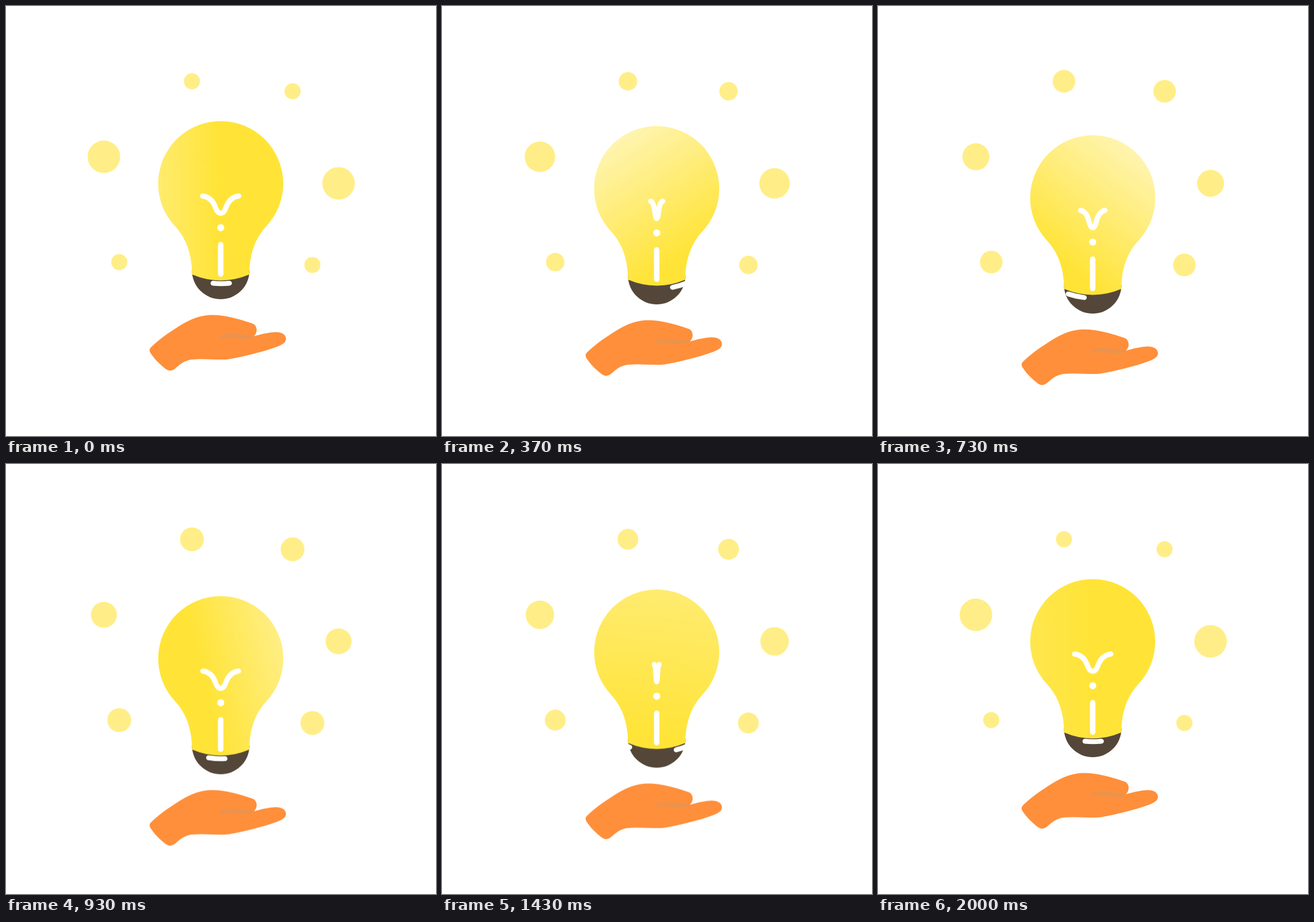
An HTML page for the animation above (2.03 s loop, 748x748 px).

```html
<!DOCTYPE html>
<html lang="en">
<head>
<meta charset="utf-8">
<title>Floating light bulb</title>
<style>
  html, body { margin: 0; width: 100%; height: 100%; overflow: hidden; background: #fff; }
  svg { display: block; width: 748px; height: 748px; }

  /* Two seconds of motion plus a short hold: 49.26% = 1 s, 98.52% = 2 s */
  .float, .small, .big, .glow, .wire, .band {
    animation-duration: 2030ms;
    animation-iteration-count: infinite;
    animation-timing-function: cubic-bezier(.37, 0, .63, 1);
  }

  .float { animation-name: float; }
  @keyframes float {
    0%, 98.52%, 100% { transform: translateY(0); }
    49.26% { transform: translateY(30px); }
  }

  .spark { fill: #ffee87; }
  .small { r: 14px; animation-name: grow; }
  @keyframes grow {
    0%, 98.52%, 100% { r: 14px; }
    49.26% { r: 20.8px; }
  }
  .big { r: 28.3px; animation-name: shrink; }
  @keyframes shrink {
    0%, 98.52%, 100% { r: 28.3px; }
    49.26% { r: 22.5px; }
  }

  /* Light swings over the bulb and back, weaker on the way back */
  .glow {
    transform-origin: 370px 460px;
    animation-name: swing, fade;
    animation-timing-function: linear;
  }
  @keyframes swing {
    0%, 98.52%, 100% { transform: rotate(-90deg); }
    18.23%, 80.3% { transform: rotate(-34deg); }
    28.08%, 70.44% { transform: rotate(6deg); }
    49.26% { transform: rotate(90deg); }
  }
  @keyframes fade {
    0%, 49.26% { opacity: 1; }
    59%, 100% { opacity: .42; }
  }

  .white { fill: none; stroke: #fff; stroke-linecap: round; stroke-linejoin: round; }

  /* Filament turning around the vertical axis */
  .wire { stroke-width: 9px; animation-name: turn; }
  @keyframes turn {
    0%, 49.26%, 98.52%, 100% {
      d: path("M342 330.5 C353 332 359 338 363 347 C366 355 368 360.5 373.5 360.5 C379 360.5 381 355 384 347 C388 338 394 332 405 330.5");
      animation-timing-function: cubic-bezier(.47, 0, .745, .715);
    }
    24.63%, 73.89% {
      d: path("M375.4 330.5 C374.7 332 374.4 338 374.1 347 C374 355 373.8 360.5 373.5 360.5 C373.2 360.5 373 355 372.9 347 C372.6 338 372.3 332 371.6 330.5");
      animation-timing-function: cubic-bezier(.39, .575, .565, 1);
    }
  }

  .band {
    stroke-width: 8.5px;
    stroke-dasharray: 28 80;
    animation-name: spin;
    animation-timing-function: linear;
  }
  @keyframes spin {
    0% { stroke-dashoffset: -40; }
    98.52%, 100% { stroke-dashoffset: -256; }
  }
</style>
</head>
<body>
<svg viewBox="0 0 748 748">
  <defs>
    <path id="glass" d="M294 383 A108.7 108.7 0 1 1 453 383 C435 402 423.3 430 423.3 467 Q373.5 488 323.7 467 C323.7 430 312 402 294 383 Z"/>
    <clipPath id="inside"><use href="#glass"/></clipPath>
    <linearGradient id="light" gradientUnits="userSpaceOnUse" x1="0" y1="460" x2="0" y2="213">
      <stop offset="0" stop-color="#fff5b8" stop-opacity="0"/>
      <stop offset="1" stop-color="#fff5b8"/>
    </linearGradient>
  </defs>

  <g class="spark">
    <circle class="small" cx="323.5" cy="131"/>
    <circle class="small" cx="498.5" cy="148.3"/>
    <circle class="small" cx="197" cy="445.5"/>
    <circle class="small" cx="533" cy="450.5"/>
    <circle class="big" cx="170.3" cy="262.3"/>
    <circle class="big" cx="578.5" cy="308.5"/>
  </g>

  <g class="float">
    <path fill="#544739" d="M323.5 460 A50 50 0 0 0 423.5 460 Z"/>
    <use href="#glass" fill="#ffe437"/>
    <g clip-path="url(#inside)">
      <rect class="glow" x="-130" y="-140" width="1000" height="600" fill="url(#light)"/>
    </g>

    <g class="white">
      <path class="wire" d="M342 330.5 C353 332 359 338 363 347 C366 355 368 360.5 373.5 360.5 C379 360.5 381 355 384 347 C388 338 394 332 405 330.5"/>
      <path stroke-width="9.5" d="M373.5 415.3 V466.3"/>
      <path class="band" pathLength="108" d="M320.3 472 Q374.3 494 428.3 472"/>
    </g>
    <circle cx="373.5" cy="385.7" r="6.2" fill="#fff"/>

    <path fill="#ff8f3a" d="M251 603 C248 597 251 595 256 590 C270 577 288 565 305 554.5 C321 544.5 339 537.5 359 537.5 C381 537.5 408 545 429 552.5 C438 556 438 569 431 574.5 C443 571.5 454 568 466 567.5 C478 566.5 487 571 487 579 C487 586 480 589 472 592.5 C446 602 411 610.5 387 614.5 C369 616.5 345 612.5 323 615 C310 616.5 302 624 295 630 C288 635.500 284 635.500 278 631.500 C268 624 257 613 251 603 Z"/>
    <path fill="#ea934f" d="M371 577 C373 571.5 380 570 389 570 C405 570 419 573.5 432 573.5 L428 577.5 C416 580 404 579.5 394 577 C386 575.5 379 577.5 373 578.5 Z"/>
  </g>
</svg>
</body>
</html>
```
